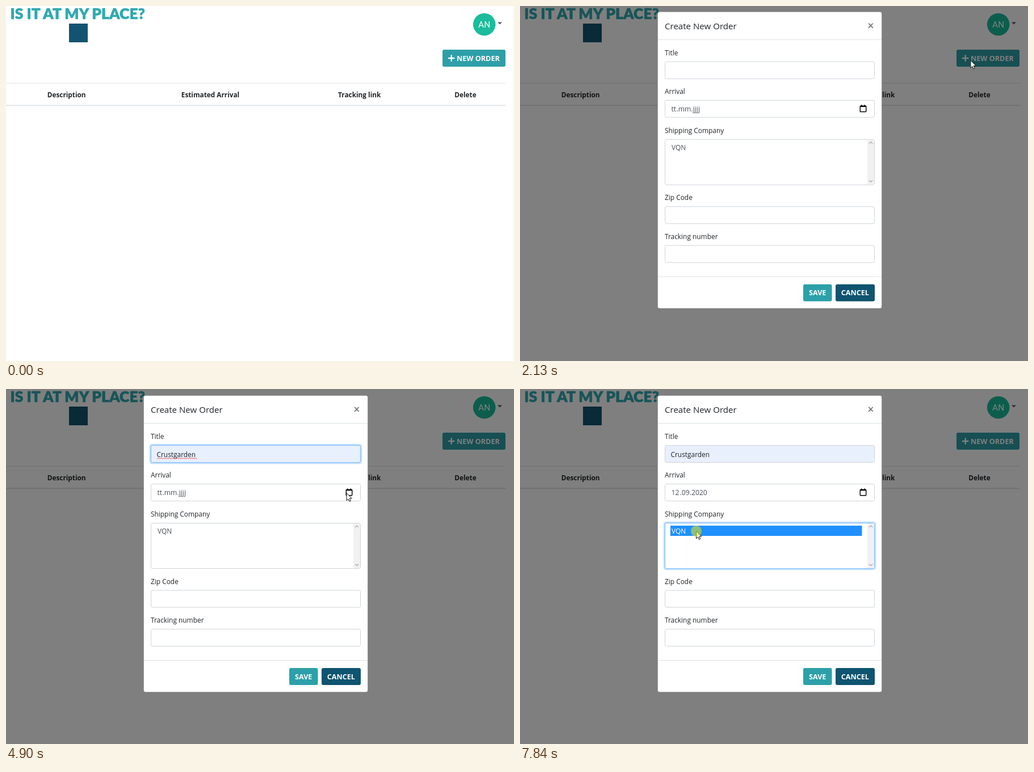
Write an HTML page that moves like this. It is 895 px wide and 626 px high and loops after 7.99 s.

```html
<!DOCTYPE html>
<html lang="en">
<head>
<meta charset="utf-8">
<title>Order form</title>
<style>
  html, body { margin: 0; width: 100%; height: 100%; overflow: hidden; background: #fff; }
  svg { display: block; width: 895px; height: 626px; }
  text { font: 11.9px "Open Sans", "Noto Sans", sans-serif; fill: #212529; white-space: pre; }
  .mid { text-anchor: middle; }
  .head { font-weight: 700; font-size: 11.8px; }
  .btn { font-weight: 700; font-size: 12.6px; fill: #fff; }
  .value { fill: #495057; font-size: 12.2px; }
  .brand { font: 900 26.4px Lato, sans-serif; fill: #2fa9b0; stroke: #2fa9b0; stroke-width: .6; stroke-linejoin: round; }
  .initials { font: 400 15.5px Roboto, sans-serif; fill: #fff; }
  .field { fill: #fff; stroke: #ced4da; }
  .rule { stroke: #dee2e6; }
  .line { fill: none; stroke-linecap: round; stroke-linejoin: round; }
  .popup { filter: drop-shadow(0 1px 2px rgba(0,0,0,.4)); }
  .small { font-size: 9.1px; font-weight: 500; fill: #000; }
  .day { font-size: 9px; fill: #111; }
  .dim { fill: #999; }
</style>
</head>
<body>
<svg viewBox="0 0 895 626">
  <text class="brand" x="7.5" y="23">IS IT AT MY PLACE?</text>
  <rect x="111" y="31" width="33" height="33" fill="#12546f"/>
  <circle cx="842.7" cy="32.5" r="19.8" fill="#1abc9c"/>
  <text class="initials mid" x="842.7" y="38">AN</text>
  <path d="M866 28.5h8l-4 4z" fill="#555b60"/>
  <rect id="newBtn" x="769" y="77" width="111" height="30" rx="3"/>
  <path class="line" d="M780 92h9.4M784.7 87.3v9.4" stroke="#fff" stroke-width="2.4"/>
  <text class="btn" x="794" y="96.8">NEW ORDER</text>
  <path class="rule" d="M0 136.2h880"/>
  <path class="rule" d="M0 175.4h880" stroke-width="1.6"/>
  <g id="heads"></g>

  <rect id="backdrop" width="895" height="626"/>

  <g id="modal">
    <rect x="242.5" y="11.5" width="395" height="523" rx="3.5" fill="#fff" stroke="#000" stroke-opacity=".2"/>
    <text x="255" y="42" style="font-size:15.1px;font-weight:500">Create New Order</text>
    <path class="line" d="M614.6 32.4l6.6 6.8m0-6.8l-6.6 6.8" stroke="#7d7d7d" stroke-width="1.9"/>
    <path class="rule" d="M243 60.5h394M243 478.5h394"/>
    <g id="fields"></g>
    <rect id="ring" x="254" width="372" rx="4" fill="none" stroke="#bfdeff" stroke-width="2.6"/>
    <rect id="ringEdge" x="255.5" width="369" rx="3" fill="none" stroke="#80bdff"/>

    <text id="title" x="265.5" y="120"></text>
    <path id="wavy" class="line" stroke="#e8453c" stroke-width=".9"/>
    <path id="caret" d="M265.8 107v16" stroke="#000"/>

    <rect id="dateMark" x="265.5" y="173.5" height="18" fill="#0078d7"/>
    <text class="value" id="day" x="266.5" y="187"></text>
    <text class="value" id="month" y="187"></text>
    <rect x="599.3" y="177.5" width="10.4" height="10.2" rx=".8" fill="none" stroke="#000" stroke-width="1.4"/>
    <path d="M599.3 178.4h10.4M601.7 175.4v2M607.3 175.4v2" stroke="#000" stroke-width="1.7"/>

    <rect x="612" y="237" width="12" height="79" fill="#f1f1f1"/>
    <path class="line" d="M615.4 243.6l2.7-2.7l2.7 2.7M615.4 308.8l2.7 2.7l2.7-2.7" stroke="#a3a3a3" stroke-width="1.2"/>
    <rect id="optionMark" x="265" y="241" width="337.5" height="18" fill="#1e90ff"/>
    <text class="value" id="option" x="267" y="255" style="font-size:11.9px">VQN</text>

    <rect x="499" y="492" width="50.5" height="30" rx="3" fill="#2ca0a9"/>
    <text class="btn mid" x="524.2" y="511.7">SAVE</text>
    <rect x="556" y="492" width="69" height="30" rx="3" fill="#0f5470"/>
    <text class="btn mid" x="590.4" y="511.7">CANCEL</text>
  </g>

  <g id="list">
    <rect class="popup" x="255" y="131" width="152.7" height="155" rx="1.5" fill="#fff"/>
    <rect id="listMark" x="255" width="152.7" height="28.6" fill="#d8e1e9"/>
    <g id="items"></g>
  </g>

  <g id="picker">
    <rect class="popup" x="255" y="200" width="175" height="222" rx="2" fill="#fff"/>
    <text x="265" y="219" style="font-size:10px;font-weight:600">September 2020</text>
    <path d="M347 214h6l-3 3.5z" fill="#333"/>
    <path class="line" d="M394 219v-7m-3 3l3-3l3 3M412 212v7m-3-3l3 3l3-3" stroke="#333" stroke-width="1.2"/>
    <rect id="dayMark" width="20" height="20" rx="2" fill="#dfe7f3"/>
    <g id="days"></g>
    <text x="265" y="415" style="font-size:9.5px;fill:#0060c0">Heute</text>
  </g>

  <path id="cursor" d="M0 0V13.2L3 10.4L5 14.8L7.2 13.9L5.3 9.5H9.4Z" fill="#fff" stroke="#111" stroke-width="1"/>
  <circle id="click" r="9.5" fill="#d4e028" opacity=".6"/>
</svg>
<script>
const LOOP = 7990, ROW = 28.6, LIST_TOP = 136.8;
const $ = id => document.getElementById(id);
const clamp = v => Math.max(0, Math.min(1, v));
const show = (id, on) => $(id).style.display = on ? '' : 'none';
const set = (id, attrs) => { for (const k in attrs) $(id).setAttribute(k, attrs[k]); };
const label = (x, y, text, cls = '') => `<text x="${x}" y="${y}" class="${cls}">${text}</text>`;

const names = ['Test', 'Test3', 'Zolepu', 'Test2', 'Crustgarden'];
const chosen = names[4];

// label, top edge and height of each form field
const fields = [
  ['Title', 99.5, 30], ['Arrival', 167.5, 30], ['Shipping Company', 236.5, 80],
  ['Zip Code', 355, 30], ['Tracking number', 423.5, 30]
];

// cursor tip: time, x, y
const path = [
  [70, 797, 488], [140, 794, 300], [210, 792, 173], [350, 792, 173], [600, 806, 110],
  [750, 813, 85], [830, 813, 85], [900, 822, 92], [980, 818, 88.5], [1960, 818, 88.5],
  [2130, 794, 96], [2210, 788, 100], [2320, 788, 100], [2620, 424, 118], [3080, 424, 118],
  [3200, 402, 142], [3280, 354, 164], [3400, 350, 172], [3880, 322, 262], [4260, 322, 262],
  [4740, 588, 186], [4820, 600, 183.5], [5200, 600, 183.5], [5590, 434, 299],
  [5670, 426, 297], [5970, 384, 294], [6590, 384, 294], [7050, 316, 264],
  [7400, 316, 264], [7680, 310.5, 250.5]
];

// start, end of each press
const presses = [[1360, 1660], [2680, 2830], [3970, 4120], [5000, 5150], [6200, 6370], [7150, 7300], [7760, LOOP]];

$('heads').innerHTML =
  [['Description', 106.7], ['Estimated Arrival', 360], ['Tracking link', 622.7], ['Delete', 809.5]]
    .map(([s, x]) => label(x, 160.8, s, 'head mid')).join('');

$('fields').innerHTML = fields.map(([s, y, h], i) =>
  label(255, y - 11.4, s) +
  `<rect class="field" id="field${i}" x="255.5" y="${y}" width="369" height="${h}" rx="3"/>`).join('');

$('items').innerHTML = names.map((s, i) => label(265, LIST_TOP + ROW * (i + .5) + 3.2, s, 'small')).join('');

let days = ['Mo', 'Di', 'Mi', 'Do', 'Fr', 'Sa', 'So'].map((s, i) => label(276 + i * 22, 246, s, 'day mid dim')).join('');
for (let i = 0; i < 42; i++) {
  const n = i === 0 ? 31 : i > 30 ? i - 30 : i;
  days += label(276 + i % 7 * 22, 271 + Math.floor(i / 7) * 24, n, 'day mid' + (i < 1 || i > 30 ? ' dim' : ''));
}
$('days').innerHTML = days;
$('wavy').setAttribute('d', 'M266 123.2' + 'l1.75-1.7l1.75 1.7'.repeat(20));

function cursorAt(t) {
  const i = path.findIndex(p => p[0] > t);
  if (i < 0) return path.at(-1).slice(1);
  if (i === 0) return path[0].slice(1);
  const [t0, x0, y0] = path[i - 1], [t1, x1, y1] = path[i], k = (t - t0) / (t1 - t0);
  return [x0 + (x1 - x0) * k, y0 + (y1 - y0) * k];
}

function drawForm(t, x, y) {
  const focus = t < 2720 ? -1 : t < 5000 ? 0 : t < 7230 ? 1 : 2;
  show('ring', focus >= 0);
  show('ringEdge', focus >= 0);
  if (focus >= 0) {
    const [, top, h] = fields[focus];
    set('ring', { y: top - 1.5, height: h + 3 });
    set('ringEdge', { y: top, height: h });
  }

  // suggestion list with live preview in the title field
  const row = Math.max(0, Math.min(4, Math.floor((y - LIST_TOP) / ROW)));
  const hover = t >= 3200, picked = t >= 4120;
  show('list', t >= 2830 && !picked);
  show('listMark', hover);
  set('listMark', { y: LIST_TOP + ROW * row });
  $('field0').style.fill = hover ? '#e8f0fe' : '#fff';
  $('title').textContent = picked ? chosen : hover ? names[row] : '';
  $('title').style.fontSize = picked ? '11.9px' : '10.2px';
  show('caret', focus === 0 && !picked);
  show('wavy', focus === 0 && picked);

  // date
  const dated = t >= 6370;
  $('day').textContent = dated ? '12' : 'tt';
  $('month').textContent = dated ? '.09.2020' : '.mm.jjjj';
  set('month', { x: dated ? 281.5 : 275.5 });
  set('dateMark', { width: dated ? 15.5 : 10 });
  show('dateMark', focus === 1);
  $('day').style.fill = focus === 1 ? '#fff' : '';
  show('picker', t >= 5160 && !dated);
  const col = Math.floor((x - 265) / 22), line = Math.floor((y - 256) / 24);
  show('dayMark', col >= 0 && col < 7 && line >= 0 && line < 6);
  set('dayMark', { x: 266 + col * 22, y: 258 + line * 24 });

  // carrier
  const marked = t >= 7760;
  show('optionMark', marked);
  $('option').style.fill = marked ? '#fff' : '';
}

function draw(t) {
  const [x, y] = cursorAt(t);
  show('cursor', t >= 70);
  set('cursor', { transform: `translate(${x} ${y})` });
  show('click', presses.some(([a, b]) => t >= a && t < b));
  set('click', { cx: x, cy: y });

  set('newBtn', { fill: t > 680 && t < 2050 ? '#2b9ca5' : '#2e9fa8' });
  set('backdrop', { opacity: .5 * clamp((t - 1734) / 150) });

  const slide = Math.pow(1 - clamp((t - 1870) / 300), 1.7);
  set('modal', { opacity: clamp((t - 1870) / 150), transform: `translate(0 ${-39 * slide})` });
  drawForm(t, x, y);
}

const start = performance.now();
function tick() {
  draw((performance.now() - start) % LOOP);
  requestAnimationFrame(tick);
}
tick();
</script>
</body>
</html>
```
